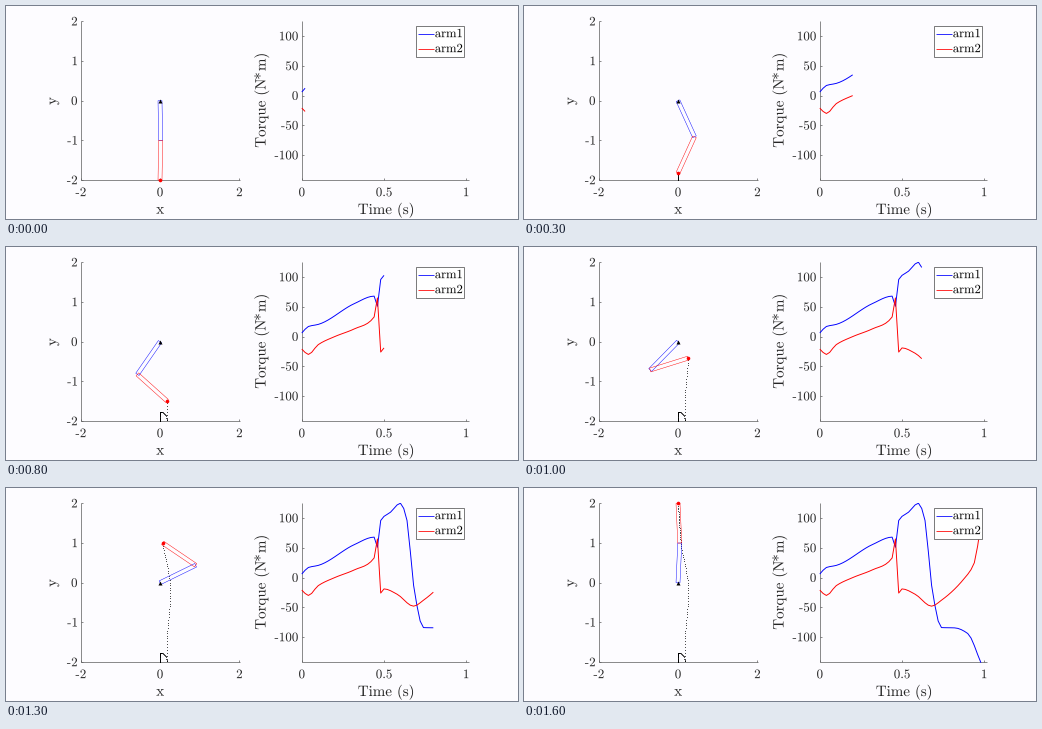
A matplotlib script for the animation above (1700 ms loop, 512 by 213 pixels).

```python
import numpy as np
import matplotlib as mpl
import matplotlib.pyplot as plt
from matplotlib.animation import FuncAnimation
from matplotlib.patches import PathPatch, Polygon, Rectangle
from matplotlib.path import Path
from matplotlib.textpath import TextPath
from matplotlib.transforms import Affine2D

mpl.rcParams["mathtext.fontset"] = "cm"

W, H, DPI = 512, 213, 64
PX = 72 / DPI  # one pixel in points
FRAMES, INTERVAL = 17, 100
TICK, LABEL = 13, 15
INK, FRAME = "#262626", "#5c5c5c"
BLUE, RED = "#0000ff", "#ff0000"


def smooth(*keys):
    """Monotone cubic curve through (time, value) key points."""
    t, v = np.array(keys, float).T
    h = np.diff(t)
    s = np.diff(v) / h
    w0, w1 = 2 * h[1:] + h[:-1], h[1:] + 2 * h[:-1]
    same = s[:-1] * s[1:] > 0
    safe = np.where(same[:, None], np.column_stack([s[:-1], s[1:]]), 1)
    inner = np.where(same, (w0 + w1) / (w0 / safe[:, 0] + w1 / safe[:, 1]), 0)
    m = np.concatenate([s[:1], inner, s[-1:]])

    def curve(q):
        i = np.clip(np.searchsorted(t, q, side="right") - 1, 0, len(h) - 1)
        u = (q - t[i]) / h[i]
        return (v[i] + u * u * (3 - 2 * u) * (v[i + 1] - v[i])
                + h[i] * u * (1 - u) * ((1 - u) * m[i] - u * m[i + 1]))
    return curve


# The hand dips, rebounds at the flip, then shoots up to full reach
FLIP = .445
hand_x = smooth((0, 0), (.2, 0), (.32, .02), (.4, .135), (.44, .172), (.5, .175),
                (.65, .262), (.68, .235), (.8, .07), (.98, 0))
hand_y = smooth((0, -2), (.02, -1.9997), (.2, -1.82), (.32, -1.76), (.4, -1.84),
                (.44, -1.985), (.5, -1.49), (.68, .1), (.8, 1), (.98, 1.998))

torque1 = smooth((0, 6), (.04, 17), (.1, 20.5), (.32, 55.5), (.44, 68), (.46, 51),
                 (.48, 96), (.54, 110), (.6, 125), (.64, 96), (.68, -13),
                 (.74, -84), (.82, -84.5), (.9, -94), (.98, -143))
torque2 = smooth((0, -21), (.04, -30), (.1, -13.5), (.2, 0), (.32, 13), (.44, 33),
                 (.46, 65), (.48, -26), (.5, -19), (.58, -28), (.68, -48),
                 (.74, -38), (.88, -1), (.94, 25), (.98, 90))


def arm_px(x, y):
    return 154 + 39.7 * np.asarray(x), 94.7 - 39.7 * np.asarray(y)


def plot_px(t, v):
    return 295.8 + 164.4 * np.asarray(t), 89.6 - .595 * np.asarray(v)


def hand(t):
    return hand_x(t), hand_y(t)


def elbow(t):
    x, y = hand(t)
    bend = np.arccos(min(np.hypot(x, y) / 2, 1))
    angle = np.arctan2(x, -y) + (bend if t < FLIP else -bend)
    return np.sin(angle), -np.cos(angle)


def link(a, b, half=.05):
    """Corner pixels of a thin bar from a to b."""
    a, b = np.array(a), np.array(b)
    d = (b - a) / np.hypot(*(b - a))
    n = half * np.array([-d[1], d[0]])
    corners = np.array([a + n, b + n, b - n, a - n])
    return np.column_stack(arm_px(*corners.T))


fig = plt.figure(figsize=(W / DPI, H / DPI), dpi=DPI, facecolor="#fdfcff")
ax = fig.add_axes([0, 0, 1, 1])
ax.set(xlim=(0, W), ylim=(H, 0))
ax.axis("off")


def text(s, x, y, size, align=.5, rot=0, color=INK, z=2):
    """Roman text on the baseline y; a leading dash becomes a hyphen."""
    path = TextPath((0, 0), r"$\mathrm{%s}$" % s.lstrip("-"), size=size)
    if s.startswith("-"):
        dash = Affine2D().scale(.266 * size, .06 * size).translate(.01 * size, .187 * size)
        digits = path.transformed(Affine2D().translate(size / 3, 0))
        path = Path.make_compound_path(Path.unit_rectangle().transformed(dash), digits)
    box = path.get_extents()
    place = Affine2D().translate(-box.x0 - align * box.width, 0)
    place.rotate_deg(rot).scale(1, -1).translate(x, y)
    ax.add_patch(PathPatch(path.transformed(place), fc=color, lw=0, zorder=z))


def line(xs, ys, color=FRAME, width=.7, z=1):
    return ax.plot(xs, ys, color=color, lw=width * PX, zorder=z,
                   solid_capstyle="butt", solid_joinstyle="round")[0]


def axes_frame(left, right, xticks, yticks):
    """L-shaped axes with inward ticks; ticks are (pixel, label) pairs."""
    top, bottom = 15, 174
    line([left, left], [top, bottom])
    line([left, right], [bottom, bottom])
    for x, s in xticks:
        line([x, x], [bottom, bottom - 2])
        text(s, x, 190.2, TICK)
    for y, s in yticks:
        line([left, left + 2], [y, y])
        text(s, left - 4, y + 4.2, TICK, align=1)


axes_frame(75, 233.5,
           [(arm_px(v, 0)[0], str(v)) for v in (-2, 0, 2)],
           [(arm_px(0, v)[1], str(v)) for v in range(-2, 3)])
axes_frame(295.8, 463.4,
           [(plot_px(v, 0)[0], f"{v:g}") for v in (0, .5, 1)],
           [(plot_px(0, v)[1], str(v)) for v in range(-100, 101, 50)])

text("x", 154.2, 207.7, LABEL)
text("y", 50.3, 95, LABEL, rot=90)
text(r"Time\hspace{0.38}(s)", 379.7, 208, LABEL)
text(r"Torque\hspace{0.38}(N\hspace{0.57}m)", 259.5, 94.7, LABEL, rot=90)
text(r"\ast", 255.3, 70, LABEL, rot=90)

# Legend
ax.add_patch(Rectangle((410, 20), 48.4, 31, fc="white", ec=FRAME, lw=.8 * PX, zorder=6))
for y, color, name in ((28, BLUE, "arm1"), (43, RED, "arm2")):
    line([412, 428], [y, y], color, .8, 7)
    text(name, 429.3, y + 3.2, 12.6, align=0, color="black", z=7)

# Moving parts
trail, = ax.plot([], [], "o", color="black", alpha=.7, ms=.9 * PX, mew=0, zorder=3)
bars = [ax.add_patch(Polygon(np.zeros((4, 2)), fill=False, ec=c, lw=.45 * PX, zorder=4))
        for c in (BLUE, RED)]
ax.plot(*arm_px(0, 0), "^", color="black", ms=4 * PX, mew=0, zorder=5)
tip, = ax.plot([], [], "o", color=RED, ms=3.6 * PX, mew=0, zorder=5)

window = Rectangle((295, 15), 169, 159.5, transform=ax.transData)
curves = [line([], [], c, .95, 4) for c in (BLUE, RED)]
for curve in curves:
    curve.set_clip_path(window)


def update(frame):
    t = .02 + .06 * frame
    joint, end = elbow(t), hand(t)
    bars[0].set_xy(link((0, 0), joint))
    bars[1].set_xy(link(joint, end))
    ex, ey = arm_px(*end)
    tip.set_data([ex], [ey])
    trail.set_data(*arm_px(*hand(np.arange(0, t, .0075))))
    ts = .02 * np.arange(3 * frame + 2)
    for curve, torque in zip(curves, (torque1, torque2)):
        curve.set_data(*plot_px(ts, torque(ts)))
    return [*bars, tip, trail, *curves]


anim = FuncAnimation(fig, update, frames=FRAMES, interval=INTERVAL, repeat=True,
                     repeat_delay=0)
plt.show()
```
